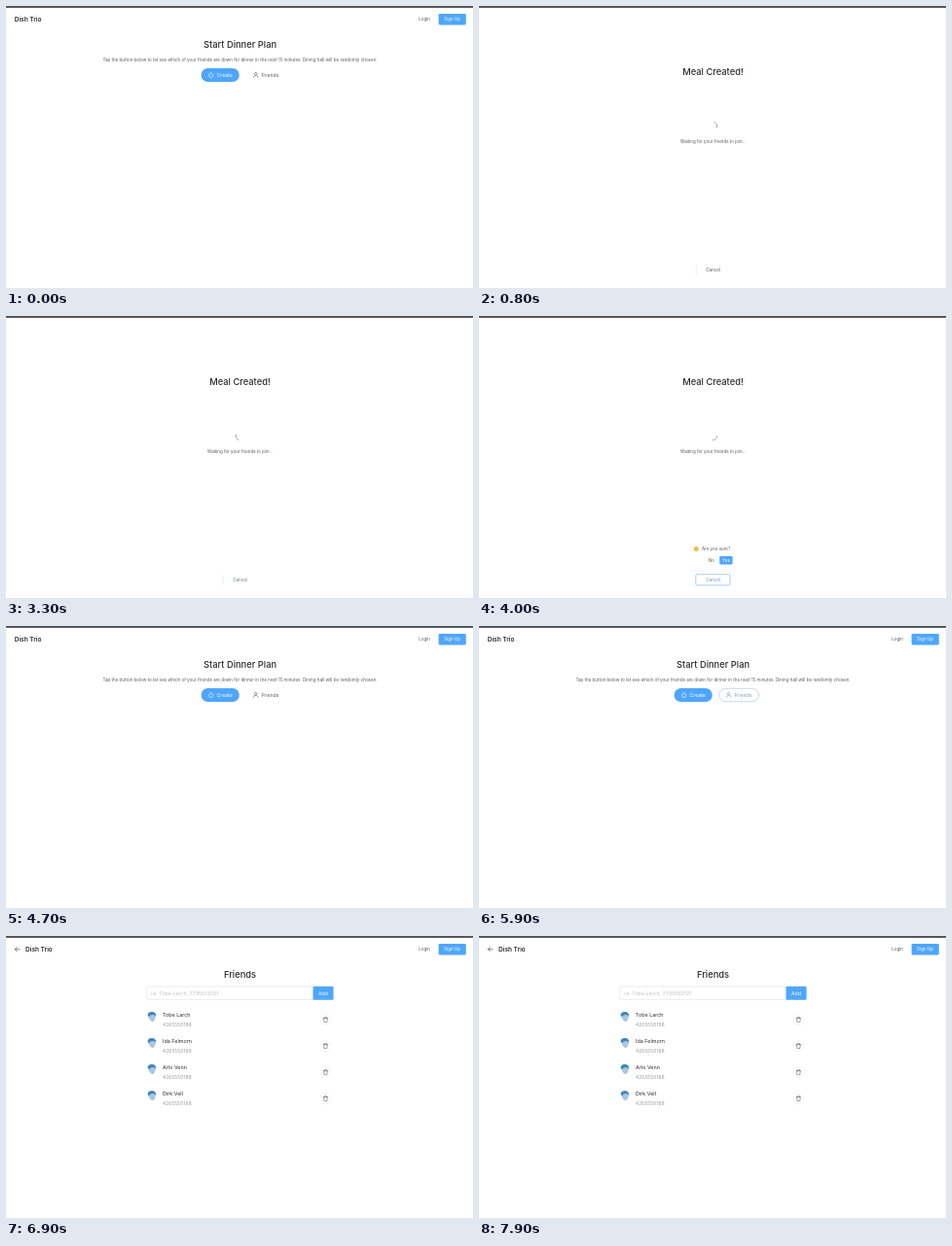
These frames come from a looping animation (480 by 290 pixels, 8000 ms). An HTML page:

```html
<!DOCTYPE html>
<html lang="en">
<head>
<meta charset="utf-8">
<title>Dinner plan</title>
<style>
  html, body { margin: 0; width: 100%; height: 100%; overflow: hidden; background: #fff; }
  svg { display: block; width: 480px; height: 290px; font-family: Inter, "Open Sans", sans-serif; }
  text { fill: #5c5c5c; font-size: 4.55px; }
  .title { fill: #2b2b2b; font-size: 9.35px; font-weight: 500; text-anchor: middle; }
  .brand { fill: #2b2b2b; font-size: 6.5px; font-weight: 600; }
  .mid { text-anchor: middle; }
  .big { font-size: 5.1px; }
  .name { fill: #2b2b2b; font-size: 5.4px; }
  .phone { fill: #939393; font-size: 4.7px; letter-spacing: .2px; }
  .hint { fill: #c0c0c0; font-size: 5.33px; }
  .blue { fill: #4fa6f9; }
  .white { fill: #fff; }
  .line { fill: none; stroke: #5c5c5c; stroke-width: .6; stroke-linecap: round; stroke-linejoin: round; }
</style>
</head>
<body>
<svg viewBox="0 0 480 290">
  <rect width="480" height="290" fill="#fff"/>
  <rect width="480" height="1.9" fill="#505050"/>

  <g id="header">
    <path id="back" class="line" style="stroke:#333" d="M14 13.7H9.4M11.4 11.6L9.3 13.7L11.4 15.8"/>
    <text id="brand" class="brand" x="8.7" y="16">Dish Trio</text>
    <text x="424.2" y="15.4">Login</text>
    <rect class="blue" x="444.6" y="8" width="28.2" height="11.4" rx="1.3"/>
    <text class="white mid" x="458.6" y="15.4">Sign Up</text>
  </g>

  <g id="home">
    <text class="title" x="240.5" y="43.2">Start Dinner Plan</text>
    <text class="mid" x="240.5" y="57.2" style="font-size:4.52px">Tap the button below to let see which of your friends are down for dinner in the next 15 minutes. Dining hall will be randomly chosen.</text>
    <rect id="create" x="200.6" y="64.1" width="39.2" height="13.8" rx="6.9"/>
    <path class="line" style="stroke:#fff" d="M209.3 69.6A2.2 2.2 0 1 0 212.1 69.6M210.7 68.2V69.9"/>
    <text class="white big" x="216.6" y="72.9">Create</text>
    <rect id="pill" x="246.8" y="64.3" width="40.8" height="13.4" rx="6.7" fill="none" stroke="#b3c7d6" stroke-width=".7"/>
    <path id="user" class="line" d="M254.4 73.4C254.6 70.5 258.8 70.5 259 73.4M256.7 68.3a1.4 1.4 0 1 0 .01 0"/>
    <text id="friendsText" class="big" x="262.5" y="72.9">Friends</text>
  </g>

  <g id="meal">
    <text class="title" x="240.5" y="71.2">Meal Created!</text>
    <path id="spin" class="line" style="stroke:#777" d="M243.51 120.49A4.25 4.25 0 0 1 243.51 126.51"/>
    <text class="mid" x="240.8" y="141" style="font-size:4.48px">Waiting for your friends to join...</text>
    <path id="edge" d="M223.3 266.5V276.5" stroke="#e6e6e6" stroke-width=".6"/>
    <rect id="cancelBox" x="222.8" y="265.7" width="35.2" height="11.2" rx="1.4" fill="none" stroke="#8db8dd" stroke-width=".7"/>
    <text id="cancel" class="mid" x="240.6" y="273.1">Cancel</text>
  </g>

  <g id="confirm">
    <circle cx="223.3" cy="239.4" r="2.5" fill="#efbd4c"/>
    <text x="228.9" y="241" style="font-size:4.52px">Are you sure?</text>
    <rect x="232.6" y="247.2" width="12.6" height="8.2" rx="1.2" fill="none" stroke="#f1f1f1" stroke-width=".5"/>
    <text class="mid" x="238.8" y="253">No</text>
    <rect class="blue" x="247.3" y="247.1" width="13.3" height="8.4" rx="1.2"/>
    <text class="white mid" x="254" y="253">Yes</text>
    <path d="M216.5 261.9H264" stroke="#ebebeb" stroke-width=".6"/>
  </g>

  <g id="friends">
    <text class="title" x="240.5" y="43.2">Friends</text>
    <rect id="field" x="144.6" y="52" width="171.2" height="13.4" rx="1.2" fill="#fff" stroke-width=".6"/>
    <text class="hint" x="148.4" y="60.7">i.e. Tobe Larch, 7735550121</text>
    <path class="blue" d="M315.6 51.8H335.4Q336.6 51.8 336.6 53V64.5Q336.6 65.7 335.4 65.7H315.6Z"/>
    <text class="white big mid" x="326" y="60.6">Add</text>
    <g id="list"></g>
  </g>
</svg>

<script>
const LOOP = 8000, STEP = 100;
const people = ["Tobe Larch", "Ida Felmorn", "Arlo Venn", "Dirk Vell"];
const $ = id => document.getElementById(id);

// Each entry holds from its time until the next one.
const steps = {
  page: [[0, "home"], [800, "meal"], [4500, "home"], [6100, "friends"]],
  create: [[0, "#4fa6f9"], [500, "#479ff4"], [600, "#4199ef"], [800, "#4fa6f9"]],
  hover: [[0, 0], [5900, 1], [6100, 0]],
  cancel: [[0, "#5c5c5c"], [3300, "#687a8a"], [3400, "#7396b3"]],
  cancelBox: [[0, 0], [3500, .6], [3600, 1]],
  confirm: [[0, 0], [3700, .35], [3800, .8], [3900, 1], [4500, .55], [4600, .2], [4700, 0]],
  field: [[0, "#dfdfdf"], [6500, "#e5e5e5"], [6900, "#dfdfdf"], [7300, "#e5e5e5"], [7900, "#dfdfdf"]]
};

function at(key, t) {
  let value;
  for (const [start, v] of steps[key]) if (t >= start) value = v;
  return value;
}

function set(id, attrs) {
  for (const key in attrs) $(id).setAttribute(key, attrs[key]);
}

function show(id, on) {
  $(id).style.display = on ? "" : "none";
}

$("list").innerHTML = people.map((name, i) => `
  <g transform="translate(0 ${i * 27.05})">
    <path d="M146 81Q146.5 78 150 78Q154 78 154 82Q153.8 86 151 88.2Q147 87.6 146 81Z" fill="#a9c7de"/>
    <path d="M145.6 82Q145.5 78 150 78Q154.2 78.2 154 82.4L151.8 81Q148.5 80.6 147.2 83Z" fill="#3f86bd"/>
    <text class="name" x="161" y="82.8">${name}</text>
    <text class="phone" x="161" y="93">4265550188</text>
    <circle cx="328.4" cy="86.1" r="5.4" fill="none" stroke="#e6e6e6" stroke-width=".5"/>
    <path class="line" style="stroke-width:.55" d="M326 84.6H330.8M327.3 84.5V83.5H329.5V84.5M326.6 84.7L326.9 88.6H329.9L330.2 84.7"/>
  </g>`).join("");

function draw(t) {
  const page = at("page", t), hover = at("hover", t), lit = at("cancelBox", t);
  for (const id of ["home", "meal", "friends"]) show(id, id === page);
  show("header", page !== "meal");
  show("back", page === "friends");
  set("brand", { x: page === "friends" ? 20 : 8.7 });

  set("create", { fill: at("create", t) });
  show("pill", hover);
  const ink = hover ? "#6f9cc4" : "#5c5c5c";
  $("user").style.stroke = ink;
  $("friendsText").style.fill = ink;

  // One turn per second, redrawn ten times a second.
  const angle = -25 + Math.floor((t - 800) / STEP) * 36;
  set("spin", { transform: `rotate(${angle} 240.5 123.5)` });
  $("cancel").style.fill = at("cancel", t);
  set("cancelBox", { opacity: lit });
  show("edge", !lit);
  set("confirm", { opacity: at("confirm", t) });
  set("field", { stroke: at("field", t) });
}

const begin = performance.now();
function tick() {
  draw((performance.now() - begin) % LOOP);
  requestAnimationFrame(tick);
}
tick();
</script>
</body>
</html>
```
